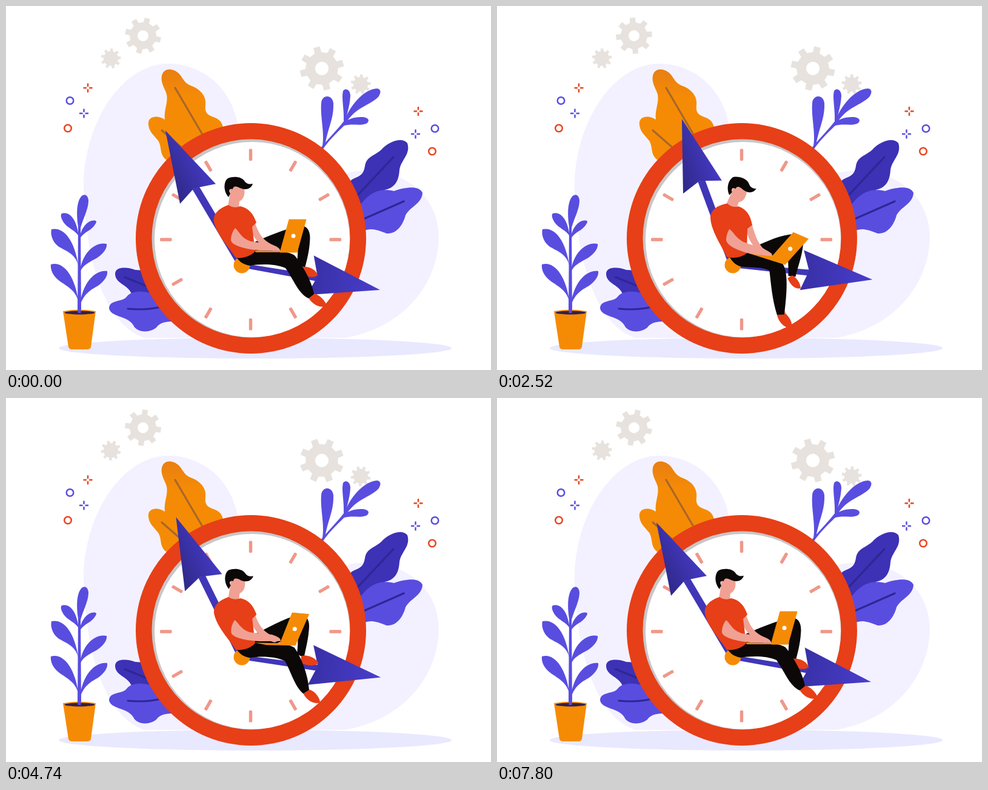
Recreate the animation shown at these times as an HTML page. Size 800 px wide and 600 px high, loop 7.83 s.

```html
<!DOCTYPE html>
<html lang="en">
<head>
<meta charset="utf-8">
<title>Working on the clock</title>
<style>
html, body { margin: 0; width: 100%; height: 100%; overflow: hidden; background: #fff; }
svg { display: block; width: 100vw; height: 100vh; }
.red { fill: #e73f17; } .orange { fill: #f58b05; } .skin { fill: #f0a193; }
.ink { fill: #0b0807; } .violet { fill: #594de0; } .indigo { fill: #3d31b5; }
.vein { fill: none; stroke-width: 3.2; stroke-linecap: round; }
</style>
</head>
<body>
<svg viewBox="0 0 800 600">
  <defs>
    <linearGradient id="up" x1="0" x2="1"><stop offset=".1" stop-color="#302a8c"/><stop offset="1" stop-color="#4439c2"/></linearGradient>
    <linearGradient id="side" x1="0" x2="1"><stop offset="0" stop-color="#3830a6"/><stop offset="1" stop-color="#493dcc"/></linearGradient>
    <linearGradient id="leaf" x1="0" x2="0" y1="0" y2="1"><stop offset="0" stop-color="#e97f12"/><stop offset=".35" stop-color="#f58b05"/></linearGradient>
  </defs>

  <g fill="#f3f1ff">
    <path d="M270 95C330 97 374 140 383 200L400 547H228C152 522 127 385 128 285C134 180 198 93 270 95Z"/>
    <path d="M540 285C560 271 590 269 615 273C675 282 714 325 714 382C712 460 655 530 560 547H400Z"/>
  </g>
  <ellipse cx="411" cy="564" rx="324" ry="17" fill="#e8e8ff"/>
  <g id="gears"></g>
  <g id="marks" fill="none" stroke-width="2.500"></g>

  <path fill="url(#leaf)" d="M257 124C254 104 270 101 281 108C291 114 291 125 304 131C322 137 331 150 329 164C327 180 338 181 347 185C356 190 358 197 358 203L300 240L264 196C257 176 268 162 265 146C263 138 259 134 257 124Z"/>
  <path class="orange" d="M235 196C233 182 248 180 258 185C266 189 268 193 275 198L305 230L265 254C252 245 258 233 251 222C243 212 236 207 235 196Z"/>
  <path class="vein" stroke="#a8672a" d="M279 135L323 210M257 205L288 232"/>

  <path class="indigo" d="M560 305C566 274 588 291 592 264C594 248 608 247 619 237C630 224 653 215 662 226C668 245 651 254 649 270C648 290 640 300 625 303L590 335Z"/>
  <path class="violet" d="M580 335C600 302 622 301 640 305C660 298 682 296 687 308C686 326 666 331 659 345C655 360 645 376 628 375C612 369 602 365 590 371Z"/>
  <path class="vein" stroke="#2f2694" d="M639 249L578 314M656 322L590 351"/>
  <path class="indigo" d="M180 441C181 428 203 431 213 435L230 436L240 485L207 474C200 458 180 458 180 441Z"/>
  <path class="violet" d="M170 498C171 483 193 489 200 478C208 468 230 470 240 474L277 520C262 520 254 522 248 530C236 540 215 538 210 526C200 510 172 513 170 498Z"/>
  <path class="vein" stroke="#2f2694" d="M196 447L230 461M201 499Q230 502 255 496"/>

  <g class="violet">
    <path d="M518 235C536 214 551 199 560 186L565 190C550 205 534 219 522 237Z"/>
    <path d="M521 236C527 212 518 185 520 160C521 146 538 145 540 160C541 186 531 200 526 230Z"/>
    <path d="M557 190C558 170 553 152 556 140C560 134 568 138 568 148C567 166 563 173 561 188Z"/>
    <path d="M558 191C566 165 590 137 612 136C619 137 619 143 614 150C600 164 578 166 562 191Z"/>
    <path d="M553 197C562 186 574 183 586 183C599 183 601 190 594 194C583 198 570 193 555 198Z"/>
  </g>

  <g class="violet">
    <path d="M119 360H123L124 506H118Z"/>
    <path d="M121 375C116 350 115 325 124 314C129 309 135 311 136 320C136 338 125 352 121 375Z"/>
    <path d="M120 380C116 370 100 366 94 355C90 348 90 344 92 342C105 338 117 352 120 380Z"/>
    <path d="M121 386C125 374 137 372 144 364C149 358 150 355 148 354C137 351 123 364 121 386Z"/>
    <path d="M120 432C117 408 98 404 86 396C76 388 73 376 75 368C92 364 113 380 120 432Z"/>
    <path d="M121 442C126 425 140 422 152 414C163 406 167 398 166 392C148 388 125 405 121 442Z"/>
    <path d="M120 490C116 468 100 462 88 453C77 445 73 434 74 426C93 420 114 442 120 490Z"/>
    <path d="M121 498C127 474 140 468 152 461C164 452 168 444 167 437C148 434 125 455 121 498Z"/>
  </g>
  <path class="orange" d="M94 503Q121 498 148 503L140 562Q139 566 134 566H109Q104 566 103 562Z"/>
  <ellipse cx="121.500" cy="505.500" rx="25" ry="3" fill="#33204a"/>
  <path class="violet" d="M118.500 480H123.500V506H118.500Z"/>

  <circle class="red" cx="404" cy="383" r="190"/>
  <circle cx="404" cy="383" r="163.500" fill="#c9c6c7"/>
  <circle cx="406" cy="385" r="161" fill="#fff"/>
  <g id="ticks" fill="#ef988a"></g>

  <g id="longHand" fill="url(#up)">
    <path d="M-6 0L-9 -150H3L6 0Z" fill="#4036b8"/>
    <path d="M0 -256L29 -138.500L-6 -150L-38.500 -139Z"/>
  </g>
  <g id="shortHand" fill="url(#side)">
    <path d="M0 -4V3L128 4V-6Z" fill="#4036b8"/>
    <path d="M231.500 0L114 -37L126 -4L114 29Z"/>
  </g>
  <circle class="orange" cx="389" cy="427" r="13.500"/>

  <path id="backLeg" class="ink"/>
  <path id="backShoe" class="red"/>
  <path id="frontShoe" class="red"/>
  <path id="frontLeg" class="ink"/>
  <path id="base" class="orange"/>
  <path id="farArm" class="skin"/>
  <g id="torso">
    <g id="head">
      <path class="skin" d="M370 295H392C395 307 394 318 385 322L384 332C378 335 371 334 366 331L369 312Z"/>
      <path class="ink" d="M367 315C357 303 360 288 366 284C375 280 388 281 393 288C397 294 402 294 407 293C404 302 395 304 386 300C380 297 375 296 374 302C368 300 367 305 370 309Z"/>
    </g>
    <path class="red" d="M367 328C352 333 341 342 343 356C348 378 368 398 379 415C390 417 405 412 411 404L406 364L413 357C408 343 401 333 386 330C380 333 372 332 367 328Z"/>
  </g>
  <path id="nearArm" class="skin"/>
  <path id="screen" class="orange" stroke="#f58b05" stroke-linejoin="round"/>
  <circle id="badge" r="3.500" fill="#fff"/>
</svg>
<script>
const LOOP = 7830, TIMES = [200, 1800, 3330, 4200, 5250];
const $ = id => document.getElementById(id);
const add = (id, markup) => $(id).insertAdjacentHTML('beforeend', markup);
const set = (id, name, value) => $(id).setAttribute(name, value);

// Smooth curve through rest, lean, sit, return and rest again, without overshoot.
function blend(poses, t) {
  const v = [...poses, poses[0]];
  if (t <= TIMES[0] || t >= TIMES[4]) return v[0];
  const i = TIMES.findLastIndex(x => x <= t);
  const slope = k => (v[k + 1] - v[k]) / (TIMES[k + 1] - TIMES[k]);
  const tangent = k => {
    if (k === 0 || k === 4) return 0;
    const a = slope(k - 1), b = slope(k);
    return a * b > 0 ? 2 * a * b / (a + b) : 0;
  };
  const h = TIMES[i + 1] - TIMES[i], u = (t - TIMES[i]) / h, w = 1 - u;
  return v[i] * w * w * (1 + 2 * u) + v[i + 1] * u * u * (3 - 2 * u)
    + h * u * w * (tangent(i) * w - tangent(i + 1) * u);
}

const number = /\d+(\.\d+)?/g;
function morph(poses) {
  const lists = poses.map(p => p.match(number).map(Number));
  return t => {
    let i = 0;
    return poses[0].replace(number, () => {
      const n = i++;
      return blend(lists.map(l => l[n]), t).toFixed(2);
    });
  };
}

const shapes = {
  backLeg: morph([
    'M408 390C430 380 460 368 484 362C500 361 503 376 501 390C500 405 496 420 493 432L480 424C481 412 482 402 481 392C465 402 440 408 410 408Z',
    'M420 400C440 394 460 389 482 389C500 390 506 398 505 408C503 425 496 440 492 459L481 460C480 445 480 432 476 420C460 420 440 420 412 412Z',
    'M412 400C435 386 455 366 482 358C500 355 506 365 504 378C501 400 497 412 493 428L480 424C481 412 482 402 481 392C465 402 440 412 410 412Z',
    'M408 392C430 380 455 358 482 352C496 351 500 362 498 376C496 395 492 408 490 424L480 420C481 410 482 400 481 388C465 400 440 408 410 408Z']),
  backShoe: morph([
    'M489 430C498 429 510 433 514 443C510 448 500 448 491 443Z',
    'M491 457C495 465 495 476 492 485C486 484 481 478 480 460Z',
    'M482 425C492 421 508 428 514 437C505 442 492 441 479 433Z',
    'M484 420C495 416 510 422 517 430C510 436 495 436 480 430Z']),
  frontLeg: morph([
    'M381 415C392 412 402 406 411 404C435 403 464 403 476 411C489 427 505 455 508 475L499 482C482 474 474 450 461 432C445 425 420 425 402 428C390 426 384 420 381 415Z',
    'M384 414C395 413 405 409 414 406C440 410 465 414 473 420C484 435 482 470 481 505L469 505C460 480 456 455 453 434C440 428 420 430 402 429C392 426 387 420 384 414Z',
    'M384 414C395 413 405 409 414 407C440 413 465 420 470 428C480 445 475 485 470 510L458 511C450 485 450 460 447 438C438 432 420 432 402 430C392 426 387 420 384 414Z',
    'M381 415C392 412 402 406 411 404C435 404 465 405 475 413C487 435 487 465 486 493L475 497C464 475 463 455 458 436C440 427 420 426 402 429C390 426 384 420 381 415Z']),
  frontShoe: morph([
    'M509 474C518 477 527 486 529 494C520 499 506 493 499 481Z',
    'M481 503C490 508 495 520 493 526C483 530 472 518 469 505Z',
    'M470 508C479 513 484 524 482 533C470 533 460 522 458 511Z',
    'M486 493C497 496 501 508 500 516C490 518 478 508 475 497Z']),
  base: morph([
    'M410 403L452 404L478 406L412 406Z',
    'M414 406L456 410L474 424L455 419Z',
    'M414 408L452 412L478 428L455 421Z',
    'M410 404L452 405L474 413L452 410Z']),
  screen: morph([
    'M467 352L495 352L480 406L452 406Z',
    'M486 370L512 378L474 424L453 411Z',
    'M490 375L514 387L477 427L452 416Z',
    'M481 359L507 366L474 412L451 406Z']),
  farArm: morph([
    'M403 363L411 358C416 373 422 383 433 390L450 400L442 404C420 396 407 385 403 363Z',
    'M410 364L420 360C425 377 429 388 438 397L454 407L446 410C424 402 413 386 410 364Z',
    'M411 365L421 361C426 378 430 390 438 400L453 410L446 413C424 404 414 387 411 365Z',
    'M404 363L412 358C417 373 423 383 433 390L450 402L442 405C420 397 408 385 404 363Z']),
  nearArm: morph([
    'M378 366C385 372 388 383 404 388L438 393C447 396 453 400 452 404L418 403C396 401 372 395 371 386C371 378 374 371 378 366Z',
    'M383 367C391 374 393 381 406 388L441 399C449 402 456 407 455 410L425 408C402 405 379 396 378 385C378 379 380 371 383 367Z',
    'M384 368C392 375 394 383 406 390L439 403C447 406 454 411 452 415L425 411C402 406 379 396 378 386C378 380 381 372 384 368Z',
    'M379 366C386 372 389 383 404 388L438 394C447 397 453 402 452 406L418 404C396 401 373 395 372 386C372 378 375 371 379 366Z'])
};

const gears = [[226, 49, 30, 9, 8, 14], [173, 86.5, 16.5, 0, 9, 5],
  [521, 103, 36.5, 11, 8, -14], [585, 129, 16.5, 0, 9, 5]];
gears.forEach(([x, y, r, hole, teeth, start], i) => {
  const points = [];
  for (let k = 0; k < teeth; k++)
    for (const [offset, size] of [[-.27, .74], [-.19, 1], [.19, 1], [.27, .74]]) {
      const a = (k + offset) * 2 * Math.PI / teeth;
      points.push([Math.sin(a) * r * size, -Math.cos(a) * r * size]);
    }
  add('gears', `<g id="gear${i}" fill="#e7e2dd"><polygon points="${points}"/><circle r="${hole}" fill="#fff"/></g>`);
});

const RED = '#e8451f', VIOLET = '#594de0';
for (const [x, y, c] of [[135, 135, RED], [128.5, 177, VIOLET], [680, 173.5, RED], [675.5, 211, VIOLET]])
  add('marks', `<path stroke="${c}" d="M${x - 7.5} ${y}h5.500m4 0h5.500M${x} ${y - 7.5}v5.500m0 4v5.500"/>`);
for (const [x, y, c] of [[105.5, 156, VIOLET], [102, 201.5, RED], [707.5, 202, VIOLET], [703, 239.5, RED]])
  add('marks', `<circle cx="${x}" cy="${y}" r="5.800" stroke="${c}"/>`);
for (let a = 0; a < 360; a += 30)
  add('ticks', `<rect x="-2.700" y="-149.500" width="5.400" height="19.500" rx="1.500" transform="translate(403.500 385) rotate(${a})"/>`);

function draw(now) {
  const t = now % LOOP, pose = (...values) => blend(values, t);
  gears.forEach(([x, y, , , , start], i) =>
    set('gear' + i, 'transform', `translate(${x} ${y}) rotate(${start + 360 * t / LOOP})`));
  set('longHand', 'transform', `translate(389 428) rotate(${pose(-29.5, -21.8, -17.6, -19.4)})`);
  set('shortHand', 'transform', `translate(389 428) rotate(${pose(9.95, 7.8, 4, 5.4)})`);
  for (const id in shapes) set(id, 'd', shapes[id](t));
  set('torso', 'transform', `rotate(${pose(0, 8, 9, 1)} 390 412)`);
  set('head', 'transform', `rotate(${pose(0, 7, 6, 2.5)} 376 325)`);
  set('badge', 'cx', pose(474, 483, 484, 480));
  set('badge', 'cy', pose(379, 397, 402, 385));
  // Typing: the forearms lift nine times per loop.
  const lift = 1 - Math.cos(t / LOOP * 18 * Math.PI);
  set('nearArm', 'transform', `rotate(${-1.5 * lift} 376 385)`);
  set('farArm', 'transform', `rotate(${-lift} 408 362)`);
  requestAnimationFrame(() => draw(performance.now() - began));
}
const began = performance.now();
draw(0);
</script>
</body>
</html>
```
